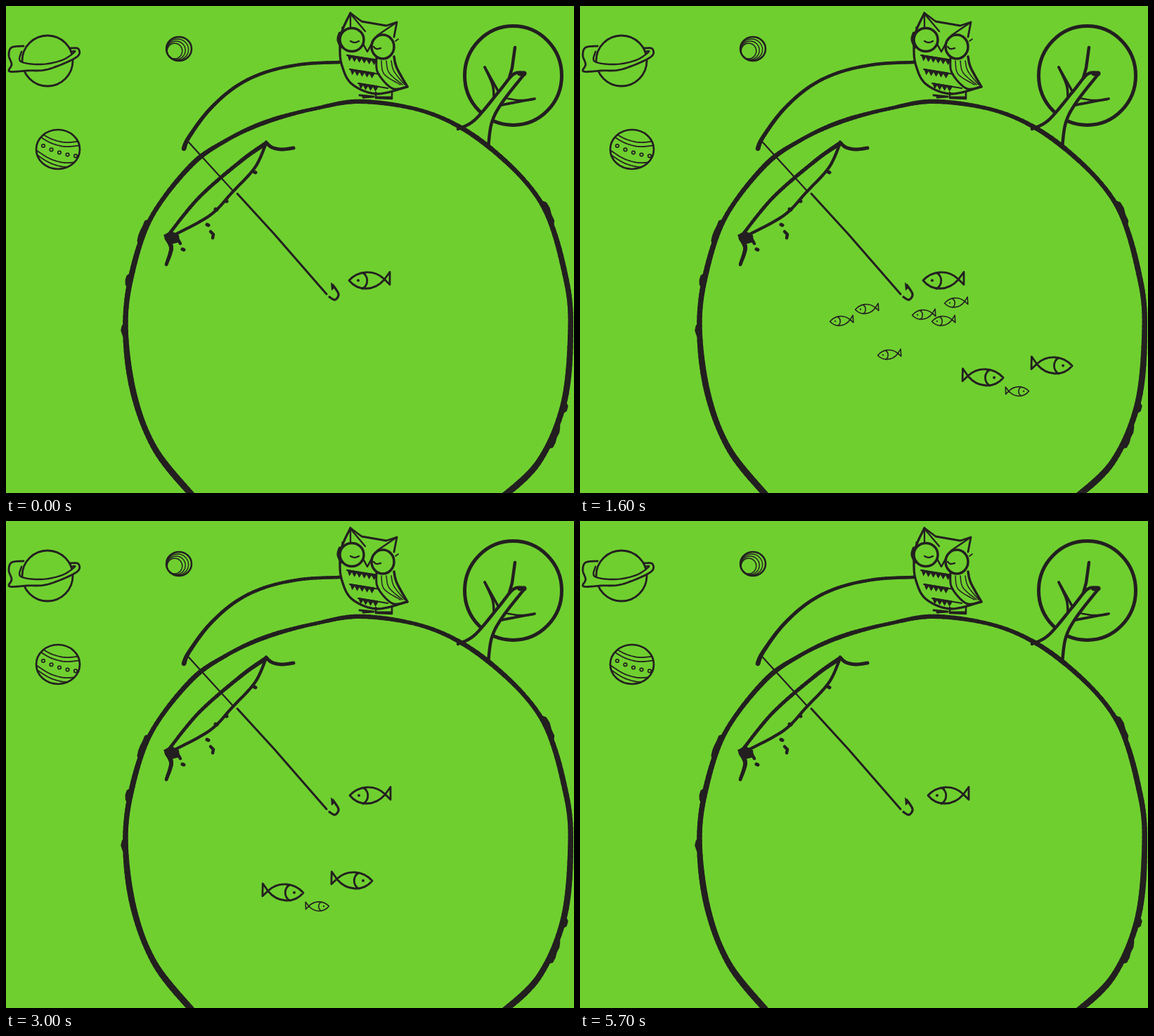
An HTML page with a canvas that plays this animation: 808 px wide and 693 px high, repeating every 5.8 s.

```html
<!DOCTYPE html>
<html lang="en">
<head>
<meta charset="utf-8">
<title>Owl fishing on a small planet</title>
<style>
html, body { margin: 0; width: 100%; height: 100%; overflow: hidden; background: #6fcf2f; }
canvas { display: block; width: 808px; height: 693px; }
</style>
</head>
<body>
<canvas id="stage" width="808" height="693"></canvas>
<script>
const GREEN = '#6fcf2f', INK = '#231f20';
const LOOP = 5800, STEP = 100, PER_SEGMENT = 12;
const stage = document.getElementById('stage').getContext('2d');
const layer = document.createElement('canvas');
layer.width = 808;
layer.height = 693;
const art = layer.getContext('2d');

for (const c of [stage, art]) {
  c.strokeStyle = c.fillStyle = INK;
  c.lineCap = c.lineJoin = 'round';
}

let seed = 7;
function random() {
  seed = seed * 16807 % 2147483647;
  return seed / 2147483647;
}

const parse = text => text.split(' ').map(p => p.split(',').map(Number));

// Catmull-Rom curve through the given points
function curve(text) {
  const p = parse(text), out = [p[0]];
  for (let i = 0; i < p.length - 1; i++) {
    const a = p[i - 1] || p[i], b = p[i], c = p[i + 1], d = p[i + 2] || c;
    for (let k = 1; k <= PER_SEGMENT; k++) {
      const t = k / PER_SEGMENT;
      out.push([0, 1].map(n => b[n] + 0.5 * t * (c[n] - a[n]
        + t * (2 * a[n] - 5 * b[n] + 4 * c[n] - d[n]
        + t * (3 * (b[n] - c[n]) + d[n] - a[n])))));
    }
  }
  return out;
}

function trace(c, points) {
  c.beginPath();
  points.forEach(([x, y]) => c.lineTo(x, y));
}

function stroke(points, w) {
  art.lineWidth = w;
  trace(art, points);
  art.stroke();
}

function fill(points, color = INK) {
  art.fillStyle = color;
  trace(art, points);
  art.fill();
  art.fillStyle = INK;
}

const brush = (text, w) => stroke(curve(text), w);
const straight = (text, w) => stroke(parse(text), w);

// Stroke whose width follows a function of its progress from 0 to 1
function taper(points, width) {
  for (let i = 1; i < points.length; i++) {
    stroke([points[i - 1], points[i]], width(i / points.length));
  }
}

function disc(x, y, rx, ry, w, color) {
  art.beginPath();
  art.ellipse(x, y, rx, ry, 0, 0, 7);
  if (color) {
    art.fillStyle = color;
    art.fill();
    art.fillStyle = INK;
  }
  art.lineWidth = w;
  art.stroke();
}

const rim = curve('268,700 213,632 182,553 170,462 178,385 206,302 262,228 312,192 370,165 '
  + '440,146 510,136 607,154 690,203 763,283 797,390 803,470 793,567 757,650 700,704');

// Rough patch on the outer side of the rim, centred on a segment position
function jag(at, half, height) {
  const from = Math.round((at - half) * PER_SEGMENT), to = Math.round((at + half) * PER_SEGMENT);
  const base = rim.slice(from, to + 1);
  const edge = base.map(([x, y], i) => {
    const angle = Math.atan2(y - 468, x - 486);
    const h = i % (base.length - 1) ? 2 + height * (0.5 + 0.5 * random()) : 0;
    return [x + h * Math.cos(angle), y + h * Math.sin(angle)];
  });
  fill(base.concat(edge.reverse()));
}

function drawPlanet() {
  taper(rim, p => 7.2 + 1.5 * Math.cos(2 * Math.PI * p) + 0.5 * Math.sin(60 * p));
  jag(3, 0.2, 5);
  jag(3.92, 0.15, 6);
  jag(4.75, 0.25, 5);
  jag(13.1, 0.2, 6);
  jag(16.05, 0.15, 6);
  jag(16.5, 0.25, 6);
}

function drawHole() {
  taper(curve('230,327 275,272 335,220 369,196'), p => 4.5 + 1.5 * p);
  brush('370,194 378,201 392,204 409,202', 5);
  brush('369,198 354,230 322,265 290,298 237,327', 4.3);
  taper(curve('229,330 235,345 228,368'), p => 7 - 2.5 * p);
  fill(parse('224,326 235,320 246,326 247,336 231,340'));
  straight('244,331 248,338', 4.5);
  straight('291,321 295,325 294,330', 4.5);
  for (const [x, y] of parse('251,346 286,311 353,236 312,277 298,289')) {
    straight(`${x},${y} ${x + 2},${y + 1}`, 5);
  }
}

function drawRod() {
  taper(curve('476,80 420,83 367,95 325,116 288,149 260,187 253,203'), p => 4.5 + 2 * p ** 3);
  straight('260,194 322,262', 2.2);
  straight('329,267 382,325 456,410', 3);
  brush('465,397 473,410 468,418 460,414', 3.2);
  fill(parse('462,393 469,400 463,405'));
}

function drawSaturn() {
  disc(59, 78, 36, 36, 2.8);
  const outer = curve('25,57 8,59 4,70 8,83 5,93 30,92 60,90 100,73 103,61 91,60');
  const inner = curve('22,65 21,79 50,83 80,77 98,65 92,65');
  fill(outer.slice(50, 96).concat(inner.slice(0, 50).reverse()), GREEN);
  stroke(outer, 2.8);
  stroke(inner, 2.4);
}

function drawMoons() {
  disc(246, 61, 18, 17, 2.5);
  for (let i = 1; i < 4; i++) disc(246 - 2 * i, 61 + i, 18 - 2.4 * i, 17 - 2 * i, 1.4);

  art.save();
  disc(74, 204, 31, 28, 2.7);
  art.clip();
  for (const y of [174, 180, 203, 209]) brush(`40,${y} 62,${y + 14} 84,${y + 20} 108,${y + 18}`, 1.8);
  art.restore();
  for (let i = 0; i < 5; i++) disc(53 + 11.5 * i, 199 + 6 * i - 0.6 * i * i, 2.3, 2.2, 1.7);
}

function drawTree() {
  disc(721.5, 99, 69, 70.5, 5);
  const left = curve('643,175 667,162 701,122 722,97 738,96');
  const right = curve('738,96 706,137 691,166 686,201');
  fill(left.concat(right), GREEN);
  stroke(left.concat(right), 4.5);
  straight('724,59 720,88 716,102', 4.5);
  brush('681,87 692,112 694,130', 3.5);
  brush('681,87 690,103 700,121', 3.5);
  brush('752,132 725,137 704,141', 3.8);
  brush('750,133 730,134 710,131', 2.5);
  straight('731,96 737,96', 7);
}

// Slanted row of dark teeth on the owl's chest
function teeth(x, y, count, width, slope) {
  const points = [[x, y - 2]];
  for (let i = 0.5; i <= count; i += 0.5) {
    points.push([x + i * width, y + (i % 1 ? 7 : 1) + i * slope]);
  }
  points.push([x + count * width, y + count * slope - 2]);
  fill(points);
}

function drawOwl() {
  brush('490,10 478,36 475,60 478,85 492,111 527,125 571,115', 3.3);
  straight('490,10 506,22 541,28 556,23 552,44', 2.8);
  straight('490,11 490,31', 2.3);
  straight('490,11 511,36', 2.3);
  straight('556,23 528,42', 2.3);
  brush('552,72 556,88 571,115', 3.5);
  brush('527,73 529,95 549,117 570,115', 3);
  for (let i = 0; i < 3; i++) {
    brush(`${534 + 7 * i},78 ${538 + 7 * i},${97 - 2 * i} ${561 + 3 * i},112`, 1.5);
  }
  disc(492, 48, 17, 16.5, 3.5, GREEN);
  disc(536, 58, 16, 17, 3.5, GREEN);
  brush('475,39 473,48 477,58', 5);
  brush('490,50 496,52 502,50', 2.3);
  brush('523,58 527,61 533,60', 2.3);
  straight('478,30 479,37', 1.7);
  straight('554,50 558,47', 1.7);
  straight('508,54 514,65 520,54', 2.5);
  for (let row = 0; row < 3; row++) {
    const x = 485 + 4 * row * row, y = 71 + 20 * row;
    teeth(x, y, 6 - row, 7, 1.1);
    straight(`${x},${y - 1} ${x + 42},${y + 6}`, 2.2);
  }
  straight('503,127 523,129 508,130', 3);
  straight('526,123 526,131 549,132 549,122', 2.6);
  straight('527,130 548,130', 3);
}

// The nose is at (x, y); dir 1 faces left, -1 faces right
function fish(x, y, scale = 1, dir = 1, tilt = 0) {
  const c = stage;
  c.save();
  c.translate(x, y);
  c.scale(scale * dir, scale);
  c.rotate(tilt);
  c.lineWidth = 2.8;
  c.beginPath();
  c.moveTo(1, 0);
  c.bezierCurveTo(14, -14, 36, -16, 51, -2);
  c.lineTo(59, 6);
  c.lineTo(59, -12);
  c.lineTo(51, -1);
  c.bezierCurveTo(37, 15, 14, 16, 1, 0);
  c.moveTo(20, -11);
  c.bezierCurveTo(29, -6, 29, 6, 20, 12);
  c.stroke();
  c.beginPath();
  c.arc(14, 0, 2, 0, 7);
  c.fill();
  c.restore();
}

// Distance swum from mid-planet, quickest in the middle
function swim(t) {
  const s = t - 1200;
  return 0.41 * s + 33.5 * Math.sin(2 * Math.PI * s / 2200);
}

// Drifts away from the hook one pixel per step, then snaps back
function drift(t) {
  const start = [100, 900, 1800, 3000, 4200, 5100].filter(s => s <= t).pop();
  const n = (t - start) / STEP + 1;
  return n <= (t < 4200 ? 6 : 7) ? n : 0;
}

function leftShoal(x) {
  for (const [dx, y] of parse('0,449 36,432 68,497 117,440 145,449 163,423')) {
    fish(x + dx, y, 0.57, 1, -0.06);
  }
}

function rightShoal(x) {
  fish(x + 61, 512, 1, -1, -0.02);
  fish(x - 37, 529, 1, -1, -0.02);
  fish(x - 1, 548, 0.57, -1, 0.03);
}

function draw(now) {
  const t = Math.floor(now / STEP) * STEP % LOOP;
  stage.fillStyle = GREEN;
  stage.fillRect(0, 0, 808, 693);
  stage.fillStyle = INK;
  stage.save();
  trace(stage, rim);
  stage.clip();
  leftShoal(549.5 - swim(t));
  if (t < 2300) rightShoal(453.5 + 0.96 * swim(t));
  else rightShoal(461 + 0.74 * (t - 3000));
  fish(487 + drift(t), 390.5);
  stage.restore();
  stage.drawImage(layer, 0, 0);
}

function tick() {
  draw(performance.now());
  requestAnimationFrame(tick);
}

drawSaturn();
drawMoons();
drawTree();
drawPlanet();
drawHole();
drawRod();
drawOwl();
tick();
</script>
</body>
</html>
```
